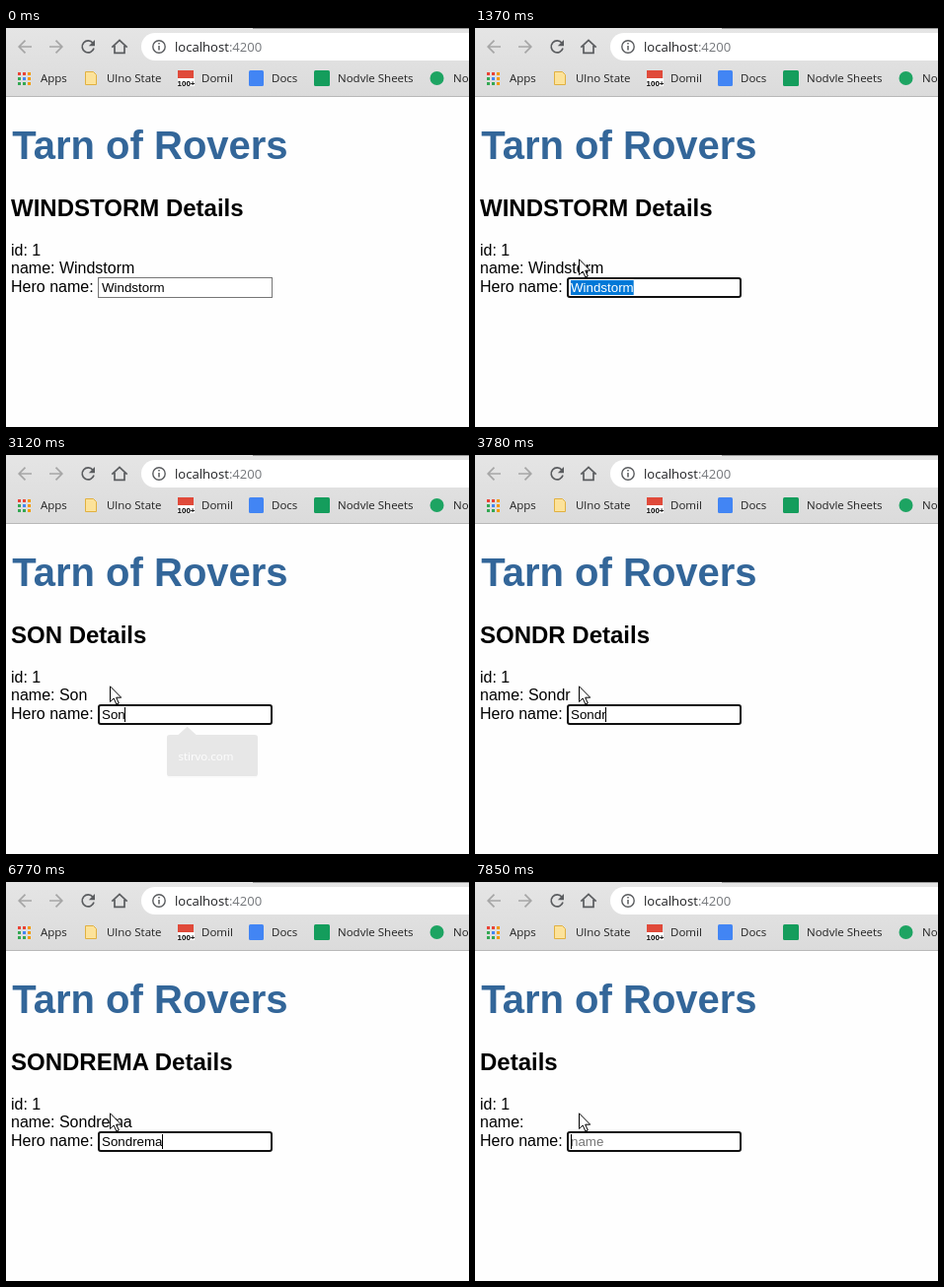
Recreate the animation shown at these times as an HTML page. Size 469 by 405 pixels, loop 8 s.

```html
<!DOCTYPE html>
<html lang="en">
<head>
<meta charset="utf-8">
<title>Hero form</title>
<style>
  html, body { margin: 0; width: 100%; height: 100%; overflow: hidden; background: #fefefe; }
  svg { display: block; }
  text { font: 16px "Liberation Sans", Arial, sans-serif; white-space: pre; }
  .ui text { font: 11.5px "Open Sans", sans-serif; fill: #222; }
  .ui .url { font-size: 13.1px; fill: #202124; }
  .ui .tip { font-size: 12px; fill: #fff; }
  .ui .badge { font: bold 8px "Liberation Sans", sans-serif; fill: #000; }
  .line { fill: none; stroke: #5a5c5f; stroke-width: 1.7; }
  .off { stroke: #a6a6a6; }
  .field { font-size: 13.333px; }
</style>
</head>
<body>
<svg width="469" height="405" viewBox="0 0 469 405">
  <defs>
    <linearGradient id="bar" x2="0" y2="1">
      <stop stop-color="#e5e5e5"/><stop offset="1" stop-color="#dbdbdb"/>
    </linearGradient>
  </defs>

  <g class="ui">
    <rect width="469" height="70" fill="url(#bar)"/>
    <rect x="250" width="219" height="1" fill="#999"/>
    <rect y="69" width="469" height="1" fill="#b8b8b8"/>
    <path class="line off" d="M26 19H13.5M19.5 12.7L13.2 19l6.3 6.3M44 19h12.5M50.5 12.7l6.3 6.3-6.3 6.3"/>
    <path class="line" d="M88 15.3A6 6 0 1 0 89 20.5"/>
    <path d="M90 12v6.2h-6.2z" fill="#5a5c5f"/>
    <path class="line" d="M107.3 19.6L115 12.4l7.7 7.2M110 18v7.3h10V18"/>
    <rect x="137" y="5" width="360" height="28" rx="14" fill="#fff"/>
    <circle class="line" cx="155" cy="19" r="6.2" style="stroke-width:1.4"/>
    <path class="line" d="M155 18v4.5M155 15v1.6" style="stroke-width:1.5"/>
    <text class="url" x="171" y="24">localhost<tspan fill="#74777b">:4200</tspan></text>

    <g id="dots"></g>
    <path d="M80.5 44.5h8l3 3v10h-11z" fill="#fce29a" stroke="#e0b040"/>
    <rect x="174" y="43" width="16" height="12" fill="#e04a3a"/>
    <rect x="174" y="51" width="17" height="8" fill="#fff"/>
    <text class="badge" x="173.5" y="58.5">100+</text>
    <rect x="246" y="43" width="15" height="16" rx="1.5" fill="#4285f4"/>
    <rect x="312" y="43" width="16" height="16" rx="1.5" fill="#149d5c"/>
    <circle cx="436.5" cy="51" r="7" fill="#1da462"/>
    <text x="35" y="55">Apps</text>
    <text x="102" y="55">Ulno State</text>
    <text x="198" y="55">Domil</text>
    <text x="269" y="55">Docs</text>
    <text x="336" y="55">Nodvle Sheets</text>
    <text x="453" y="55">Nodvle</text>
  </g>

  <text x="6.3" y="133" fill="#369" style="font-size:40px;font-weight:bold">Tarn of Rovers</text>
  <text id="head" x="5" y="191" style="font-size:24px;font-weight:bold"></text>
  <text x="5" y="231">id: 1</text>
  <text id="name" x="5" y="249"></text>
  <text x="5" y="268">Hero name:</text>

  <rect id="box" fill="#fff"/>
  <rect id="mark" y="256" height="15" fill="#0078d7"/>
  <text class="field" x="97" y="268"><tspan id="plain"></tspan><tspan id="picked" fill="#fff"></tspan></text>
  <rect id="caret" y="256" width="1" height="15"/>

  <g id="popup" class="ui">
    <rect x="161" y="284" width="96" height="45" rx="4" fill="#000" opacity=".15"/>
    <path d="M164 283h9l9.5-8.5 9.5 8.5h62a3 3 0 0 1 3 3v38a3 3 0 0 1-3 3h-90a3 3 0 0 1-3-3v-38a3 3 0 0 1 3-3z" fill="#292a2d"/>
    <text class="tip" x="173" y="310">stirvo.com</text>
  </g>

  <g id="mouse">
    <circle id="glow" cx="-1.5" r="12" fill="#fff000" opacity=".62"/>
    <path id="beam" d="M-3.5 -7.5h3l.5 .5 .5-.5h3M0 -7V7M-3.5 7.5h3l.5-.5 .5 .5h3" transform="translate(.5 .5)" fill="none" stroke="#222"/>
    <path id="arrow" d="M.5 .8V16.5l3.7-3.5 2.7 6 2.4-1-2.6-5.8h5z" fill="#fff" stroke="#000"/>
  </g>
</svg>
<script>
const LOOP = 8000, FIELD_X = 97, BLINK = 527;
const FOCUS = 566, FULL = 'Sondrema';
const $ = id => document.getElementById(id);
const set = (id, attrs) => {
  for (const key in attrs) $(id).setAttribute(key, attrs[key]);
};
const show = (id, on) => set(id, { visibility: on ? 'visible' : 'hidden' });
const last = (list, t) => list.filter(e => e[0] <= t).pop();

// Time and length of each typed or deleted state
const typing = [[2110, 1], [2960, 2], [3060, 3], [3180, 4], [3260, 5],
  [4460, 6], [4560, 7], [4660, 8], [6910, 7]];
for (let i = 0; i < 7; i++) typing.push([7310 + i * 67.5, 6 - i]);
const edits = [[0, 'Windstorm'], ...typing.map(([t, n]) => [t, FULL.slice(0, n)])];

// Time, x, y, shape, glow
const moves = [[0, -50, -50, 'arrow', 0]];
for (let i = 0; i < 9; i++) {
  const rest = (1 - Math.min(1, i / 7)) ** 2;
  const y = 264 + 132 * rest;
  moves.push([120 + i * 63.75, 229 + 77 * rest, y, y < 274 ? 'beam' : 'arrow', i === 7]);
}
moves.push([830, 229, 264, 'beam', 1], [940, 182, 262, 'beam', 1], [990, 112, 254, 'beam', 1],
  [1040, 78, 246, 'beam', 1], [1310, 99, 235, 'beam', 0], [1370, 105, 234, 'arrow', 0]);

// Time and opacity of the suggestion bubble
const bubble = [[0, 0], [2110, 1], [2960, .85], [3060, .4], [3120, .1], [3180, 0],
  [7648, 1], [7715, .85], [7783, .15], [7850, 0]];

const colors = ['#ea4335', '#ea4335', '#f29900', '#34a853', '#4285f4', '#f29900', '#34a853', '#34a853', '#f29900'];
$('dots').innerHTML = colors.map((c, i) =>
  `<rect x="${12 + i % 3 * 5}" y="${45 + Math.floor(i / 3) * 5}" width="3" height="3" fill="${c}"/>`).join('');

function drawField(t) {
  const [since, text] = last(edits, t);
  const focused = t >= FOCUS;
  const from = t < 990 || t >= 2110 ? text.length : t < 1040 ? 2 : 0;
  $('head').textContent = (text.toUpperCase() + ' Details').trim();
  $('name').textContent = 'name: ' + text;
  $('plain').textContent = text ? text.slice(0, from) : 'name';
  $('picked').textContent = text.slice(from);
  set('plain', { fill: text ? '#000' : '#757575' });

  const inset = focused ? 1 : .5;
  set('box', {
    x: 93 + inset, y: 253 + inset, width: 177 - 2 * inset, height: 21 - 2 * inset,
    rx: focused ? 2 : 0, stroke: focused ? '#101010' : '#767676', 'stroke-width': 2 * inset
  });

  const width = id => $(id).textContent ? $(id).getComputedTextLength() : 0;
  const end = FIELD_X + (text ? width('plain') : 0);
  set('mark', { x: end, width: width('picked') });
  set('caret', { x: Math.floor(end) });
  const start = Math.max(since, FOCUS);
  show('caret', focused && from === text.length && Math.floor((t - start) / BLINK) % 2 === 0);
}

function draw(t) {
  drawField(t);
  const alpha = last(bubble, t)[1];
  const scale = .955 + .045 * alpha;
  set('popup', {
    opacity: alpha,
    transform: `translate(209 305) scale(${scale}) translate(-209 -305)`
  });
  const [, x, y, shape, glow] = last(moves, t);
  set('mouse', { transform: `translate(${Math.round(x)} ${Math.round(y)})` });
  show('glow', glow);
  show('beam', shape === 'beam');
  show('arrow', shape === 'arrow');
}

const begin = performance.now();
function tick() {
  draw((performance.now() - begin) % LOOP);
  requestAnimationFrame(tick);
}
tick();
</script>
</body>
</html>
```
